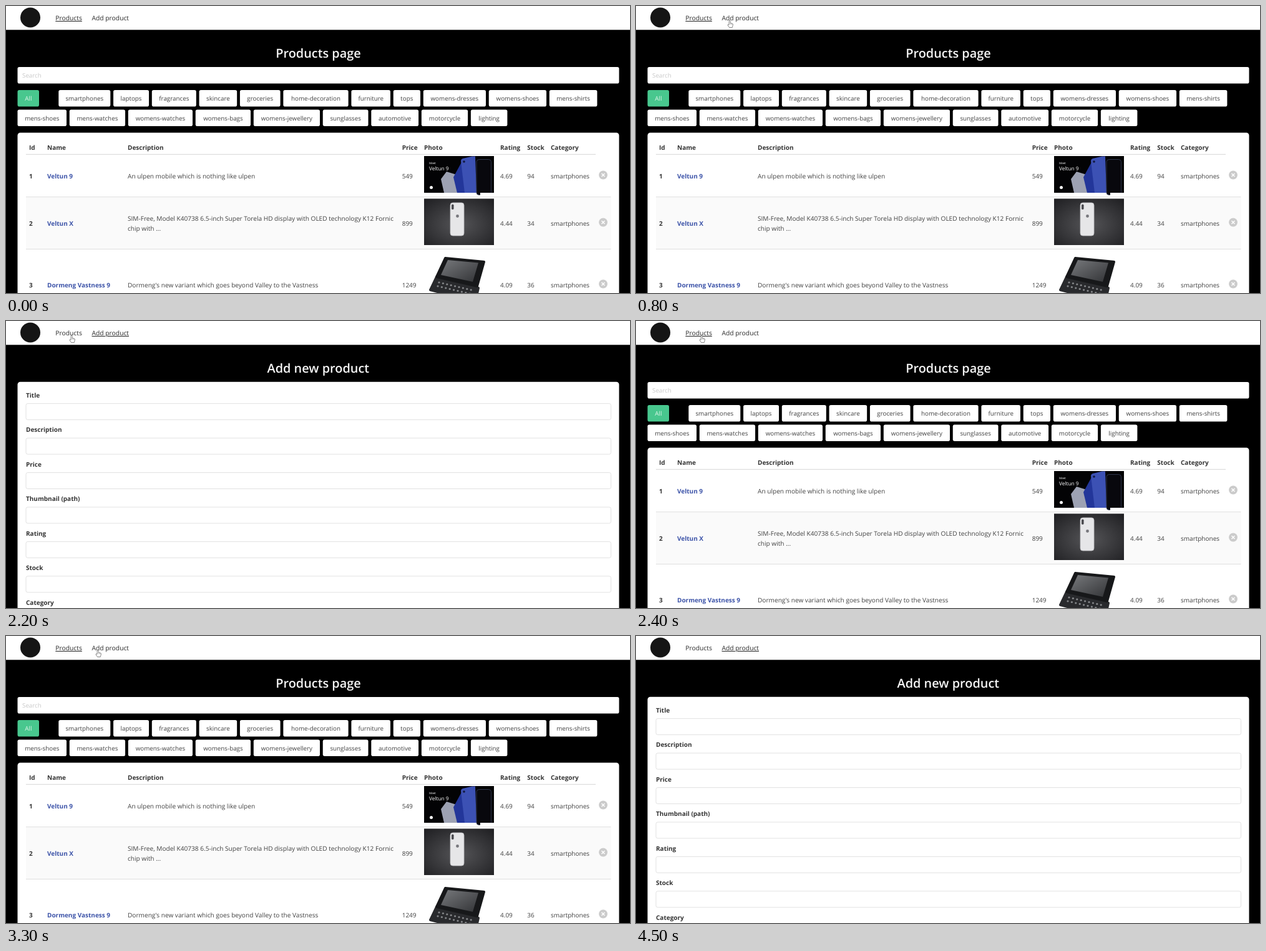
An HTML page for the animation above (4.7 s loop, 1000x461 px).

```html
<!DOCTYPE html>
<html lang="en">
<head>
<meta charset="utf-8">
<title>Product catalogue</title>
<style>
  html, body { margin: 0; width: 100%; height: 100%; overflow: hidden; background: #000; }
  svg { display: block; width: 100vw; height: 100vh; }
  text {
    font: 10px "Open Sans", "Noto Sans", sans-serif;
    fill: #424242; text-rendering: geometricPrecision;
  }
  .nav { font-size: 10.3px; fill: #2a2a2a; }
  .on { text-decoration: underline; }
  .title { font-size: 19.9px; font-weight: 600; fill: #f5f5f5; text-anchor: middle; }
  .tag { font-size: 9.8px; text-anchor: middle; }
  .bold { font-weight: 700; fill: #333; }
  .link { font-weight: 700; fill: #3c53a8; }
  .hint { font-size: 9.8px; fill: #cacaca; }
  .desc { font-size: 10.1px; }
  .pic { fill: #fff; }
</style>
</head>
<body>
<svg id="stage" viewBox="0 0 1000 461" preserveAspectRatio="none">
  <defs>
    <radialGradient id="studio" cx=".5" cy=".55" r=".75">
      <stop offset="0" stop-color="#555558"/>
      <stop offset="1" stop-color="#1d1d20"/>
    </radialGradient>
    <linearGradient id="glass" x2="1" y2="1">
      <stop offset="0" stop-color="#77797c"/>
      <stop offset="1" stop-color="#333437"/>
    </linearGradient>
  </defs>
  <rect width="1000" height="461"/>
  <rect width="1000" height="38.3" fill="#fff"/>
  <circle cx="39" cy="18.5" r="16" fill="#151515"/>
  <text id="navList" class="nav" x="79.3" y="23">Products</text>
  <text id="navAdd" class="nav" x="137.5" y="23">Add product</text>
  <g id="list"></g>
  <g id="form"></g>
  <g id="hand">
    <path d="M-1.9 1.2V-4.6Q-1.9 -5.8 -.9 -5.8T.2 -4.6V-1.4L3.3 -.8Q4.5 -.5 4.4 .8L3.8 3.6L3.2 5.6H-1.4L-3.9 2Q-4.4 1 -3.4 .6Z"
      fill="#fff" stroke="#666" stroke-width=".8" stroke-linejoin="round"/>
    <path d="M.2 -1.2V1M1.8 -.9V1M3.2 -.6V1" fill="none" stroke="#888" stroke-width=".5"/>
  </g>
  <path id="arrow" d="M-3 -6V4.4L-.6 2.3L1 5.8L2.5 5.1L1 1.8H4.2Z"
    fill="#fff" stroke="#333" stroke-width=".7"/>
</svg>
<script>
const LOOP = 4700, STEP = 100;
const $ = id => document.getElementById(id);

const text = (x, y, str, cls = "") => `<text x="${x}" y="${y}" class="${cls}">${str}</text>`;
const box = (x, y, w, h, fill, r = 0, more = "") =>
  `<rect x="${x}" y="${y}" width="${w}" height="${h}" rx="${r}" fill="${fill}" ${more}/>`;
const shape = (d, fill, more = "") => `<path d="${d}" fill="${fill}" ${more}/>`;
const dot = (x, y, r, fill) => `<circle cx="${x}" cy="${y}" r="${r}" fill="${fill}"/>`;
const rule = (y, x2, color) => shape(`M32 ${y}H${x2}`, "none", `stroke="${color}"`);

function tags(x, y, items) {
  return items.map(([name, w]) => {
    const tag = box(x, y, w, 26.5, "#fff", 2.8) + text(x + w / 2, y + 17, name, "tag");
    x += w + 4.75;
    return tag;
  }).join("");
}

function photos() {
  const round = 'stroke-linejoin="round"';
  let keys = "";
  for (let i = 0; i < 18; i++) {
    const c = i % 9, r = Math.floor(i / 9);
    keys += dot(694 + c * 6.4 - r * 2, 444 + c * 1.5 + r * 6, 1.6, "#85878a");
  }
  return box(670, 241, 112, 59, "#030305") +
    shape("M697 278L706 266L722 271L726 300H702Z", "#9da2b3") +
    shape("M717 275L730 251L737 254L744 300H723Z", "#23369a") +
    shape("M729 249Q729 246 732 245L747 241.5H752L754 300H735Z", "#3c51b4") +
    dot(734, 250, 1.8, "#11183f") +
    box(754, 246.5, 23.5, 57, "#08080d", 4, 'stroke="#39405c" stroke-width=".8"') +
    box(760, 300, 22, 5, "#fff") +
    `<text x="678" y="254" class="pic" style="font-size:4.6px">Meet</text>` +
    `<text x="678" y="264" class="pic" style="font-size:8.3px">Veltun 9</text>` +
    dot(681.5, 291.5, 2.5, "#fff") +
    box(670, 309.5, 112, 74.5, "url(#studio)") +
    box(712, 316, 22, 53, "#e6e6e8", 4, 'stroke="#b9b9bd" stroke-width=".8"') +
    box(714, 318.5, 3.6, 8.5, "#4b4b50", 1.8) +
    dot(723.5, 337.5, 2.4, "#77777c") +
    shape("M690 435L757 453L752 475L680 456Z", "#292a2d", `stroke="#292a2d" stroke-width="4" ${round}`) +
    keys +
    shape("M704 405L766 411L755 450L690 435Z", "#17181a", `stroke="#17181a" stroke-width="4" ${round}`) +
    shape("M708 408L757 412.5L748 443L697 432Z", "url(#glass)");
}

function listPage() {
  const cols = [["Id", 37], ["Name", 66], ["Description", 195], ["Price", 634.7], ["Photo", 670],
    ["Rating", 792], ["Stock", 835.3], ["Category", 873]];
  const rows = [
    [277, "Veltun 9", ["An ulpen mobile which is nothing like ulpen"], 549, "4.69", 94],
    [353, "Veltun X", ["SIM-Free, Model K40738 6.5-inch Super Torela HD display with OLED technology K12 Fornic",
      "chip with ..."], 899, "4.44", 34],
    [452, "Dormeng Vastness 9", ["Dormeng's new variant which goes beyond Valley to the Vastness"], 1249, "4.09", 36]
  ];
  const row = ([y, name, lines, price, rating, stock], i) => {
    const top = y - (lines.length - 1) * 8, cy = y - 5.5;
    return text(37, y, i + 1, "bold") + text(66, y, name, "link") +
      lines.map((s, n) => text(195, top + n * 16, s, "desc")).join("") +
      text(634.7, y, price) + text(792, y, rating) + text(835.3, y, stock) +
      text(873, y, "smartphones") + dot(957, cy, 6.9, "#cbcbcb") +
      shape(`M954.5 ${cy - 2.5}l5 5m0 -5l-5 5`, "none", 'stroke="#fff" stroke-width="1.5"');
  };
  return text(500.5, 82.5, "Products page", "title") +
    box(18.5, 98, 964, 26.5, "#fff", 2.8) + text(26, 115, "Search", "hint") +
    box(18.5, 135, 34.5, 26.5, "#48c78e", 2.8) +
    `<text x="35.8" y="152" class="tag" style="fill:#e2f6ec">All</text>` +
    tags(84.3, 135, [["smartphones", 83], ["laptops", 57], ["fragrances", 71], ["skincare", 60.6],
      ["groceries", 64.7], ["home-decoration", 104.3], ["furniture", 62.6], ["tops", 43.3],
      ["womens-dresses", 100.2], ["womens-shoes", 92.3], ["mens-shirts", 76.6]]) +
    tags(18.5, 166.5, [["mens-shoes", 78.5], ["mens-watches", 89.3], ["womens-watches", 103.2],
      ["womens-bags", 88.3], ["womens-jewellery", 106.2], ["sunglasses", 72.8], ["automotive", 75.8],
      ["motorcycle", 74.3], ["lighting", 58.5]]) +
    box(18.5, 203.5, 964, 270, "#fff", 4.4) +
    box(32, 307, 937.5, 83.5, "#fafafa") +
    cols.map(([name, x]) => text(x, 231, name, "bold")).join("") +
    rule(238.3, 945, "#d5d5d5") + rule(306.7, 969.5, "#dedede") + rule(390.5, 969.5, "#dedede") +
    rows.map(row).join("") + photos();
}

function formPage() {
  const fields = ["Title", "Description", "Price", "Thumbnail (path)", "Rating", "Stock", "Category"];
  return text(500.3, 82.5, "Add new product", "title") +
    box(18.5, 97.7, 964, 380, "#fff", 4.4) +
    fields.map((name, i) => {
      const y = i * 55.45;
      return text(32, 123 + y, name, "bold") +
        box(32, 132.6 + y, 937.5, 26, "#fff", 2.8, 'stroke="#dfdfdf" stroke-width=".9"');
    }).join("");
}

// Pointer keys: time, x, y
const track = [[100, 330, 475], [700, 151, 29], [1400, 151, 29], [1800, 106, 29], [2600, 106, 29],
  [3000, 136, 25], [3200, 148, 28], [3500, 148, 28], [4000, 400, 475]];

function pointer(t) {
  const i = track.findIndex(k => k[0] > t);
  if (i < 1) return null;
  const [t0, x0, y0] = track[i - 1], [t1, x1, y1] = track[i];
  const u = (t - t0) / (t1 - t0), e = u * u * (3 - 2 * u);
  return [x0 + (x1 - x0) * e, y0 + (y1 - y0) * e];
}

const show = (el, on) => el.setAttribute("visibility", on ? "visible" : "hidden");

function draw(ms) {
  const t = Math.floor(ms % LOOP / STEP) * STEP;
  const adding = (t >= 1200 && t < 2400) || t >= 3500;
  show($("list"), !adding);
  show($("form"), adding);
  $("navList").classList.toggle("on", !adding);
  $("navAdd").classList.toggle("on", adding);
  const p = pointer(t), inNav = p && p[1] < 38;
  show($("hand"), inNav);
  show($("arrow"), p && !inNav);
  if (p) for (const id of ["hand", "arrow"]) $(id).setAttribute("transform", `translate(${p})`);
}

$("list").innerHTML = listPage();
$("form").innerHTML = formPage();

let start;
function tick(now) {
  start ??= now;
  draw(now - start);
  requestAnimationFrame(tick);
}
draw(0);
requestAnimationFrame(tick);
</script>
</body>
</html>
```
